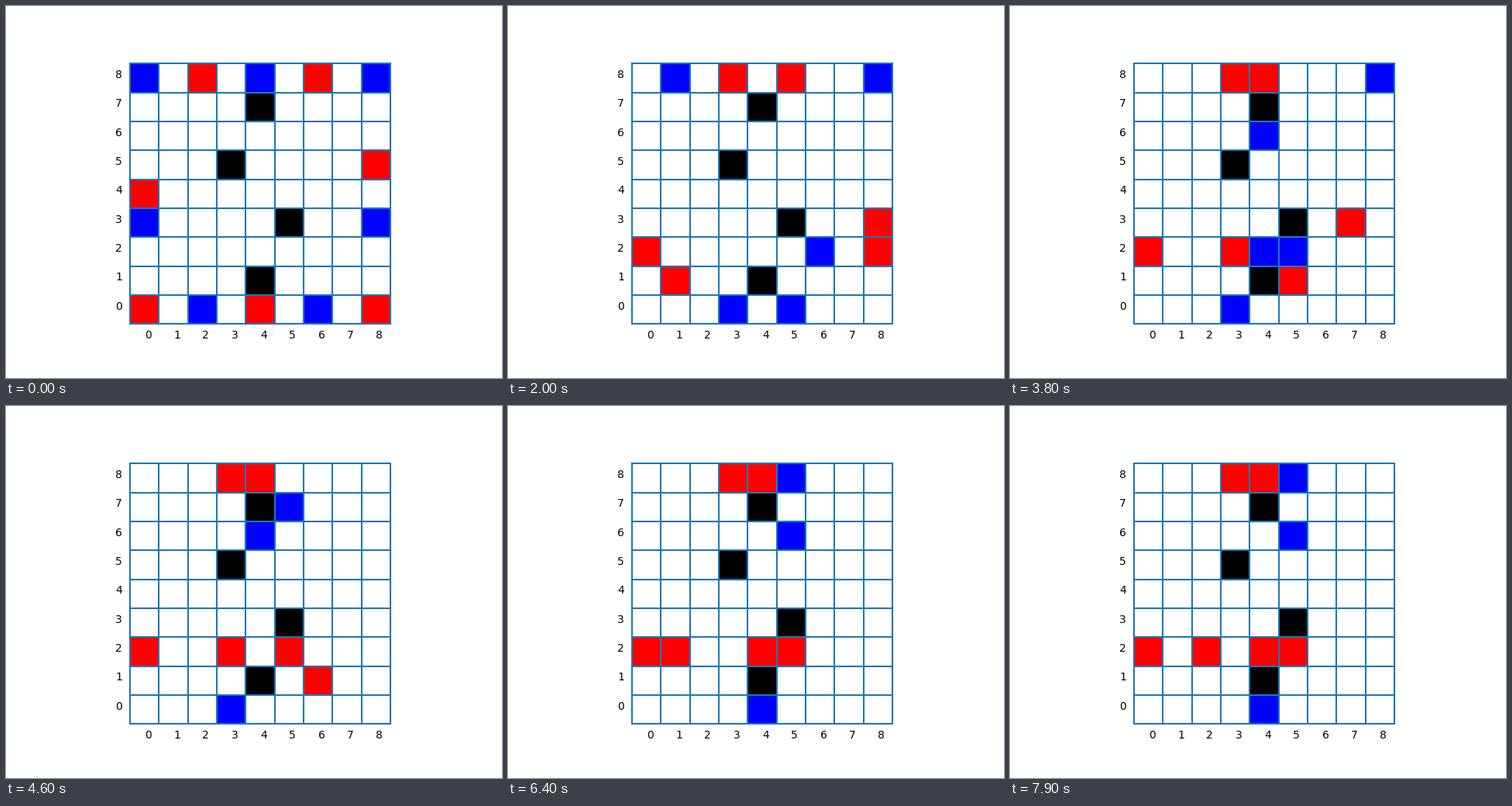
Animation, 640 px wide and 480 px high, one loop 8000 ms. Source, as a matplotlib script:

```python
import matplotlib.pyplot as plt
from matplotlib.animation import FuncAnimation
from matplotlib.patches import Rectangle

N = 9
FRAMES = 80
STEP = {"L": (-1, 0), "R": (1, 0), "U": (0, 1), "D": (0, -1)}
START = {
    "blue": "08 48 88 03 83 20 60",
    "red": "28 68 85 04 00 40 80",
    "black": "47 35 53 41",
}

# Each move: column, row, direction and, after x, the captured square.
OPENING = """
20R 85D 60Lx40 80U 83L 81U 03R 04D 13D 03D 73D 84D
12R 00U 22L 01Rx12 72L 28R 08R 68Lx48 18D 82L 62L 72L 17R 58L 27D 62D 26R
11R 36R 21U 52L 22R 50U 83L 51U 61L 88L 73D 78L 72Lx52 68L 62D 58D 51Ux42
57U 52L 30R 61U 46R 62L 56L 32L 46R 22L 56L
""".split()
SHUFFLE = "12R 46R 22L 56L".split()


def square(name):
    return int(name[0]), int(name[1])


def play(board, move):
    step, _, taken = move.partition("x")
    x, y = square(step)
    dx, dy = STEP[step[2]]
    board[x + dx, y + dy] = board.pop((x, y))
    if taken:
        del board[square(taken)]


def move_at(turn):
    if turn < len(OPENING):
        return OPENING[turn]
    return SHUFFLE[(turn - len(OPENING)) % len(SHUFFLE)]


def all_boards():
    board = {square(s): c for c, names in START.items() for s in names.split()}
    boards = [dict(board)]
    for turn in range(FRAMES - 1):
        play(board, move_at(turn))
        boards.append(dict(board))
    return boards


fig, ax = plt.subplots(figsize=(6.4, 4.8), dpi=100)
ax.set(xlim=(-0.45, N + 0.45), ylim=(-0.45, N + 0.45), aspect="equal")
ax.axis("off")

cells = {}
for x in range(N):
    for y in range(N):
        cells[x, y] = ax.add_patch(Rectangle((x, y), 1, 1, fc="white", lw=0))

for i in range(N + 1):
    ax.plot([i, i], [0, N], color="tab:blue", lw=1.5)
    ax.plot([0, N], [i, i], color="tab:blue", lw=1.5)

for i in range(N):
    ax.text(i + 0.5, -0.5, str(i), fontsize=10)
    ax.text(-0.5, i + 0.5, str(i), fontsize=10)

BOARDS = all_boards()


def draw(frame):
    board = BOARDS[frame]
    for pos, cell in cells.items():
        cell.set_facecolor(board.get(pos, "white"))
    return list(cells.values())


anim = FuncAnimation(fig, draw, frames=FRAMES, interval=100, repeat=True, repeat_delay=0)
plt.show()
```
